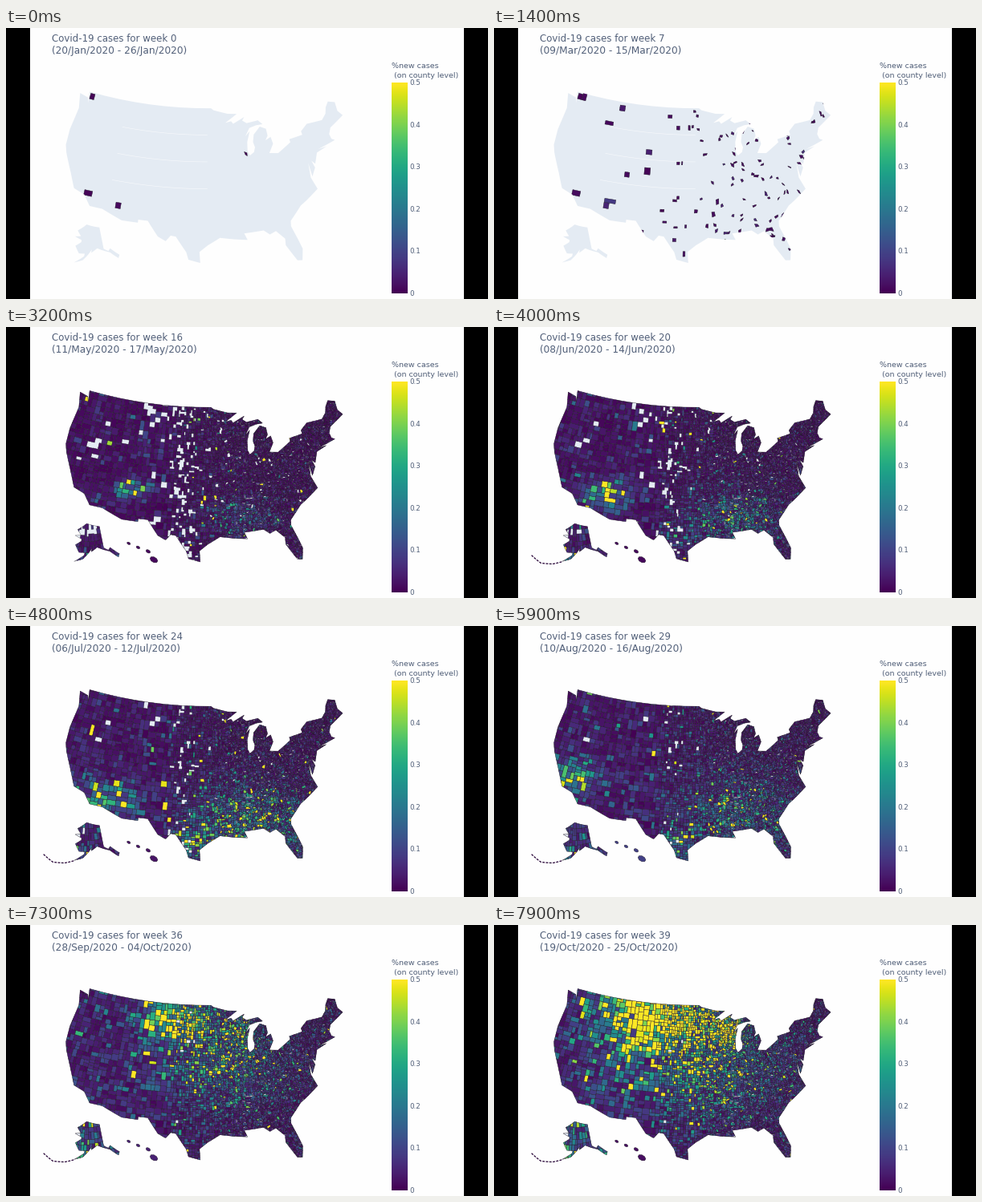
These frames come from a looping animation (600x338 px, 8000 ms). A matplotlib script:

```python
import numpy as np
import matplotlib.pyplot as plt
from matplotlib.animation import FuncAnimation
from matplotlib.collections import PolyCollection
from matplotlib.colors import to_rgba
from matplotlib.patches import PathPatch, Rectangle
from matplotlib.path import Path

W, H, DPI = 600, 338, 64
PT = 72 / DPI
WEEKS, PER_WEEK = 40, 2
LAND, INK, EDGE = "#e4ebf3", "#526079", "#1f1926"
LINE = .42 * PT
rng = np.random.default_rng(19)
weeks = np.arange(WEEKS)


def conic(lon0, p1, p2, center, k, at):
    """Albers equal-area projection from lon/lat to stage pixels."""
    s1, s2 = np.sin(np.radians([p1, p2]))
    n, c = (s1 + s2) / 2, 1 + s1 * s2

    def raw(pts):
        pts = np.asarray(pts, float)
        t = n * np.radians(pts[..., 0] - lon0)
        r = np.sqrt(c - 2 * n * np.sin(np.radians(pts[..., 1]))) / n
        return k * np.stack([r * np.sin(t), r * np.cos(t)], -1)

    shift = np.array(at) - raw(center)
    return lambda pts: raw(pts) + shift


SCALE, MID = 478, np.array([246.6, 186.3])
to_main = conic(-96, 29.5, 45.5, (-96.6, 38.7), SCALE, MID)
to_alaska = conic(-154, 55, 65, (-156, 58.5), SCALE * .35, MID + SCALE * np.array([-.307, .201]))
to_hawaii = conic(-157, 8, 18, (-160, 19.9), SCALE, MID + SCALE * np.array([-.205, .212]))


def dense(pts, steps=8):
    """Add points along each leg so straight parallels curve."""
    pts = np.asarray(pts, float)
    f = np.linspace(0, 1, steps, endpoint=False)[None, :, None]
    seg = pts[:-1, None] * (1 - f) + pts[1:, None] * f
    return np.vstack([seg.reshape(-1, 2), pts[-1:]])


north = [
    (-124.7, 48.4), (-122.8, 48.1), (-122.4, 47.3), (-122.75, 49), (-95.15, 49),
    (-94.6, 48.7), (-91.5, 48.1), (-89.5, 48), (-92.1, 46.75), (-90.8, 46.95),
    (-90.4, 46.55), (-87.9, 47.45), (-88.4, 46.95), (-87.5, 46.5), (-85, 46.75),
    (-84.1, 46.1), (-85.5, 46.05), (-87, 45.75), (-88, 44.55), (-87, 45.25),
    (-87.7, 43.7), (-87.8, 42.3), (-87.4, 41.65), (-86.5, 42.1), (-86.2, 42.8),
    (-86.5, 43.6), (-86.2, 44.7), (-84.75, 45.78), (-83.5, 45.35), (-83.35, 44.3),
    (-83.9, 43.65), (-82.75, 44.05), (-82.45, 43), (-83.45, 41.7), (-81.7, 41.5),
    (-78.9, 42.8), (-79, 43.27), (-76.2, 43.55), (-76.3, 44.1), (-74.8, 45),
    (-71.5, 45), (-70.4, 45.8), (-70, 46.7), (-69.2, 47.45), (-67.8, 47.07),
    (-67.8, 45.7), (-67, 44.85),
]
south = [
    (-70.2, 43.6), (-70.8, 42.7), (-70.6, 41.95), (-70, 41.65), (-73.7, 40.95),
    (-72, 41.05), (-74.1, 40.5), (-74.9, 38.95), (-75.5, 39.5), (-75.1, 38.4),
    (-75.95, 37.2), (-76.2, 39.3), (-76.3, 37.1), (-75.5, 35.25), (-77.9, 33.9),
    (-79.1, 33.3), (-81.3, 31.3), (-81.4, 30.5), (-80.6, 28.5), (-80.05, 26.9),
    (-80.4, 25.2), (-81.2, 25.3), (-82.75, 27.8), (-82.7, 28.8), (-84.1, 30.1),
    (-85.2, 29.7), (-86.2, 30.4), (-89.6, 30.2), (-89.1, 29.2), (-91.3, 29.4),
    (-93.8, 29.7), (-95.9, 28.6), (-97.3, 27.6), (-97.15, 25.95), (-99.1, 26.4),
    (-99.5, 27.5), (-101.4, 29.77), (-102.3, 29.88), (-103.1, 29), (-104.5, 29.6),
    (-106.5, 31.78), (-108.2, 31.78), (-108.2, 31.33), (-111.07, 31.33), (-114.8, 32.5),
    (-117.1, 32.53), (-118.5, 34), (-120.6, 34.55), (-121.9, 36.6), (-123.8, 39.3),
    (-124.35, 40.4), (-124.5, 42.8), (-124, 46.2), (-124.7, 48.4),
]
alaska = [
    (-141, 69.6), (-141, 60.3), (-137.5, 58.9), (-135.5, 59.8), (-130, 56),
    (-131.5, 54.8), (-136.5, 58.2), (-146.5, 60.9), (-151.8, 59.2), (-151.3, 60.6),
    (-154.3, 58.5), (-158.5, 56), (-164.8, 54.6), (-157.7, 57.6), (-157.2, 58.8),
    (-162, 58.7), (-166, 61.7), (-161, 63.6), (-161, 64.5), (-168, 65.6),
    (-162, 66.1), (-166.5, 68.3), (-156.5, 71.3), (-141, 69.6),
]
aleutians = [(-165, 54.4), (-171, 52.7), (-179, 51.5), (-187.5, 52.9)]
# lon, lat, radius in degrees
hawaii = [(-159.5, 22.05, .28), (-158, 21.45, .3), (-156.4, 20.85, .36), (-155.5, 19.6, .62)]

main_path = Path(to_main(dense(north + south)))
alaska_path = Path(to_alaska(dense(alaska, 3)))


def split(x0, y0, x1, y1, area):
    """Cut a lon/lat box into county-sized boxes."""
    w, h = (x1 - x0) * .78, y1 - y0
    if w * h < area((x0 + x1) / 2) * rng.uniform(.5, 1.5):
        return [[(x0, y0), (x1, y0), (x1, y1), (x0, y1)]]
    f = rng.uniform(.38, .62)
    if w > h * rng.uniform(.7, 1.3):
        m = x0 + f * (x1 - x0)
        return split(x0, y0, m, y1, area) + split(m, y0, x1, y1, area)
    m = y0 + f * (y1 - y0)
    return split(x0, y0, x1, m, area) + split(x0, m, x1, y1, area)


def bend(pts):
    """Make eastern county lines less regular."""
    lon, lat = pts[..., 0], pts[..., 1]
    e = .12 * np.clip((lon + 99) / 8, .1, 1)
    return np.stack([lon + e * np.sin(7 * lat + 2 * lon),
                     lat + e * np.sin(6 * lon - 2 * lat)], -1)


def inside(polys, path):
    return np.array([p for p in polys
                     if path.contains_points(np.vstack([p, p.mean(0)])).any()])


def county_area(lon):
    return np.interp(lon, [-105, -102, -85], [.95, .28, .16])


def bump(v, mid, spread):
    return np.exp(-((v - mid) / spread) ** 2)


def noise(n):
    """Per-county factor that drifts from week to week."""
    g = rng.normal(size=(n, WEEKS + 3))
    g = sum(g[:, i:i + WEEKS] for i in range(4)) / 2
    return np.exp(.55 * g + .55 * rng.normal(size=(n, 1)))


cells = inside(to_main(bend(np.array(split(-125, 24.5, -66.5, 49.5, county_area)))), main_path)
px, py = cells.mean(1).T
n = len(cells)


def wave(keys):
    """Soft hot area that travels between (week, x, y, radius, level) keys."""
    t, *cols = np.array(keys).T
    x, y, r, a = (np.interp(weeks, t, c) for c in cols)
    return a * bump(px[:, None], x, r) * bump(py[:, None], y, .6 * r)


east_wave = wave([(11, 387, 149, 10, .28), (16, 290, 235, 38, .06), (24, 302, 252, 75, .17),
                  (29, 300, 238, 75, .11), (34, 270, 170, 65, .11), (40, 245, 180, 95, .17)])
west_wave = wave([(11, 152, 205, 20, .08), (16, 158, 203, 16, .3), (24, 125, 216, 36, .19),
                  (29, 95, 188, 32, .2), (34, 218, 120, 30, .2), (40, 193, 114, 62, .85)])
level = .006 + .035 * weeks / WEEKS + east_wave + west_wave
# x, y, radius, peak week, level
for x, y, r, wk, a in [(288, 259, 11, 11, .2), (334, 240, 7, 11, .35),
                       (230, 272, 15, 26, .25), (291, 132, 16, 40, .6)]:
    level += a * np.outer(bump(px, x, r) * bump(py, y, r), bump(weeks, wk, 4))
level *= noise(n)

# Short local outbreaks, mostly in the thinly settled middle.
odds = .03 + .12 * bump(px, 225, 35)
peak = rng.uniform(13, 44, (n, 1))
level += .55 * (rng.random(n) < odds)[:, None] * bump(weeks, peak, 2)

gap = .03 + .5 * bump(px, 217, 15) + .1 * bump(px, 255, 40)
for x, y, r, p in [(188, 107, 17, .9), (190, 251, 11, .8), (112, 150, 18, .45)]:
    gap += p * bump(px, x, r) * bump(py, y, r)
late = rng.random(n) < gap
start = np.where(late, 11 + rng.exponential(4 + 6 * gap), rng.normal(8.7, .9, n))
start[rng.random(n) > .994] = 5
for x, y in [(108, 88), (300, 157), (100, 206), (138, 221)]:
    start[np.argmin(np.hypot(px - x, py - y))] = 0

ak_cells = inside(to_alaska(np.array(split(-169, 54, -129, 72, lambda lon: 9))), alaska_path)
ak = len(ak_cells)
ak_level = (.01 + .13 * (weeks / WEEKS) ** 2) * noise(ak)
ak_start = np.where(ak_cells[..., 1].mean(1) < 261, 12 + rng.exponential(5, ak), 9)

fig = plt.figure(figsize=(W / DPI, H / DPI), dpi=DPI, facecolor="#fefefe")
ax = fig.add_axes([0, 0, 1, 1])
ax.axis("off")
viridis = plt.get_cmap("viridis")
ax.imshow(np.linspace(1, 0, 256)[:, None], cmap=viridis, aspect="auto",
          extent=(479.7, 499.6, 331, 68))
ax.set(xlim=(0, W), ylim=(H, 0))
for x in (0, 570):
    ax.add_patch(Rectangle((x, 0), 30, H, fc="black", lw=0))


def label(x, y, s, px_size):
    return ax.text(x, y, s, size=px_size * PT, color=INK, va="baseline", family="DejaVu Sans")


label(479.5, 49.5, "%new cases", 9.45)
label(483, 61.5, "(on county level)", 9.45)
for i in range(6):
    label(502, 334 - 52.6 * i, f"{i / 10:g}", 8.8)
title = label(57, 17.3, "", 11.7)
dates = label(57, 31.8, "", 12.1)

for path in (main_path, alaska_path):
    ax.add_patch(PathPatch(path, fc=LAND, lw=0, zorder=.5))
for lat in (37, 41, 45):
    xy = to_main(dense([(-114, lat), (-96, lat)], 20))
    ax.plot(*xy.T, color="white", lw=.6 * PT, alpha=.7, zorder=.6)
coasts = [ax.add_patch(PathPatch(p, fill=False, ec=EDGE, lw=LINE, zorder=3))
          for p in (main_path, alaska_path)]


def counties(shapes, path=None):
    c = PolyCollection(shapes, linewidths=LINE)
    if path:
        c.set_clip_path(path, ax.transData)
    return ax.add_collection(c, autolim=False)


def island(lon, lat, r):
    a = np.linspace(0, 2 * np.pi, 9)
    ring = np.stack([lon + r * np.cos(a), lat + .7 * r * np.sin(a) - .3 * r * np.cos(a)], -1)
    return to_hawaii(ring)


main = counties(cells, main_path)
top = counties(ak_cells, alaska_path)
islands = counties([island(*h) for h in hawaii])
chain, = ax.plot(*to_alaska(dense(aleutians)).T, color="#2c0a3c", lw=1.3 * PT, ls=(0, (2.2, 1.1)))


def paint(coll, values, on):
    face = viridis(np.clip(values / .5, 0, 1))
    edge = np.tile(to_rgba(EDGE), (len(values), 1))
    face[:, 3] = edge[:, 3] = on
    coll.set_facecolor(face)
    coll.set_edgecolor(edge)


MONTHS = "Jan Feb Mar Apr May Jun Jul Aug Sep Oct Nov Dec".split()


def day(offset):
    y, m, d = str(np.datetime64("2020-01-20") + int(offset)).split("-")
    return f"{d}/{MONTHS[int(m) - 1]}/{y}"


def draw(frame):
    w = frame // PER_WEEK
    title.set_text(f"Covid-19 cases for week {w}")
    dates.set_text(f"({day(7 * w)} - {day(7 * w + 6)})")
    paint(main, level[:, w], start <= w)
    paint(top, ak_level[:, w], ak_start <= w)
    paint(islands, np.full(len(hawaii), .01 + .1 * bump(w, 31, 5)), w >= 8)
    for coast, begin in zip(coasts, (start, ak_start)):
        coast.set_alpha(np.mean(begin <= w) ** 2)
    chain.set_visible(w >= 18)
    return []


anim = FuncAnimation(fig, draw, frames=WEEKS * PER_WEEK, interval=100,
                     repeat=True, repeat_delay=0, blit=False)
plt.show()
```
